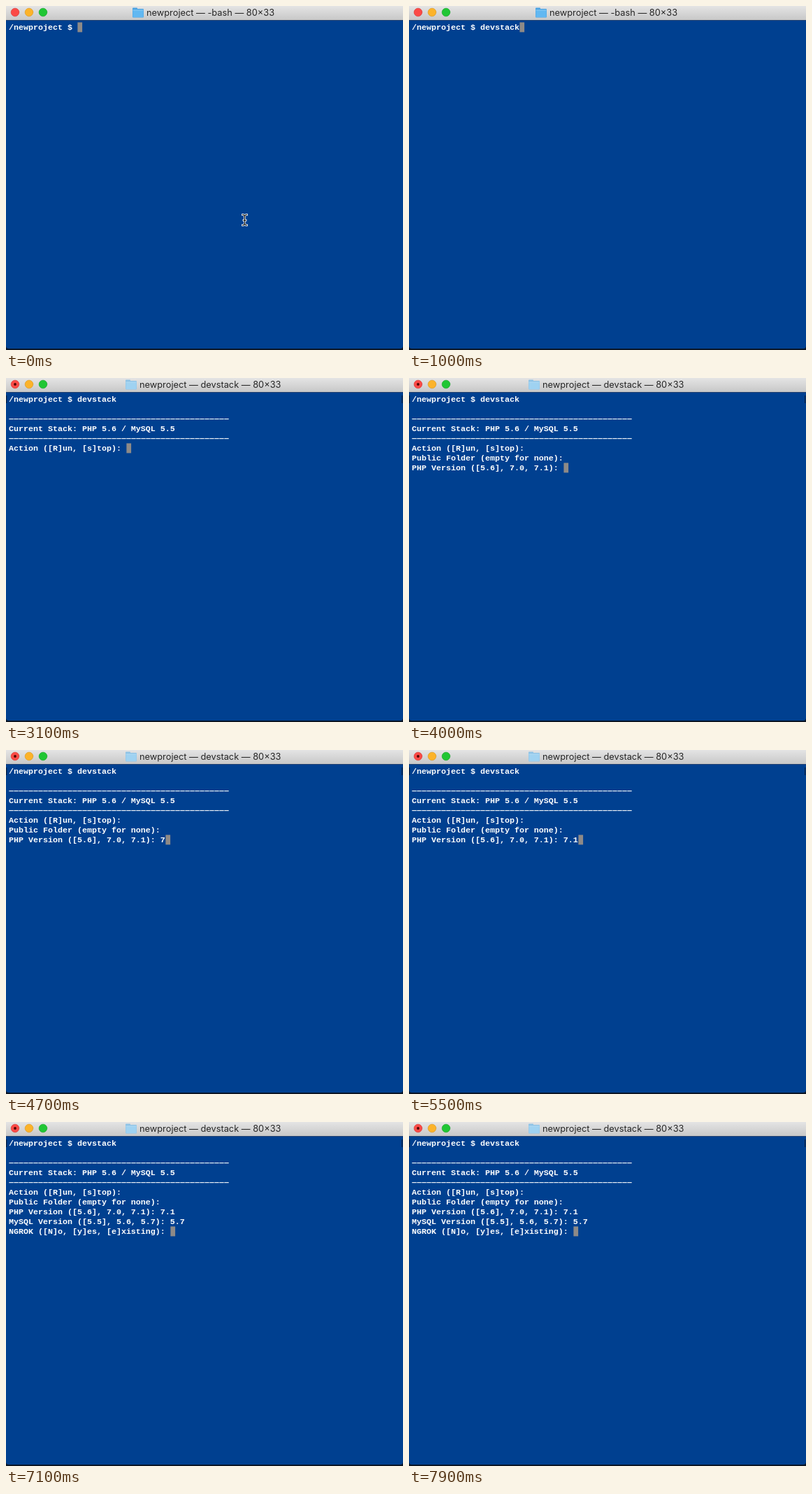
Write an HTML page with a canvas that moves like this. It is 568x492 px and loops after 8000 ms.

```html
<!DOCTYPE html>
<html lang="en">
<head>
<meta charset="utf-8">
<title>Terminal</title>
<style>
html, body { margin: 0; width: 100%; height: 100%; overflow: hidden; background: #004090; }
canvas { display: block; width: 568px; height: 492px; }
</style>
</head>
<body>
<canvas id="stage" width="568" height="492"></canvas>
<script>
const ctx = document.getElementById('stage').getContext('2d');
const W = 568, H = 492, LOOP = 8000;
const CELL = 7, LINE = 14, LEFT = 4, TOP = 23;
const MONO = 'bold 11.667px "Liberation Mono", "DejaVu Sans Mono", monospace';
const SANS = '12.8px Inter, Roboto, sans-serif';
const RUNNING = 2000;   // window title switches to the running command
const ENTER = 1300;
const RULE = '-'.repeat(45);

// Each row appears at `at`; `typed` is entered from `from`, one key per `step`.
const rows = [
  { at: 0, text: '/newproject $ ', typed: 'devstack', from: 300, step: 100 },
  { at: ENTER, text: '' },
  { at: ENTER, text: RULE },
  { at: ENTER, text: 'Current Stack: PHP 5.6 / MySQL 5.5' },
  { at: ENTER, text: RULE },
  { at: ENTER, text: 'Action ([R]un, [s]top): ' },
  { at: 3300, text: 'Public Folder (empty for none): ' },
  { at: 3800, text: 'PHP Version ([5.6], 7.0, 7.1): ', typed: '7.1', from: 4700, step: 200 },
  { at: 5800, text: 'MySQL Version ([5.5], 5.6, 5.7): ', typed: '5.7', from: 6200, step: 200 },
  { at: 6900, text: 'NGROK ([N]o, [y]es, [e]xisting): ' }
];

function rect(color, x, y, w, h) {
  ctx.fillStyle = color;
  ctx.fillRect(x, y, w, h);
}

function disc(x, y, r, fill, edge) {
  ctx.beginPath();
  ctx.arc(x, y, r, 0, Math.PI * 2);
  ctx.fillStyle = fill;
  ctx.fill();
  if (edge) {
    ctx.strokeStyle = edge;
    ctx.lineWidth = 0.7;
    ctx.stroke();
  }
}

function folder(x, faded) {
  const [back, front, edge] = faded
    ? ['#8fc3e6', '#9fd2f1', '#b9def3']
    : ['#4ba3e2', '#62b8f1', '#9bd5f8'];
  ctx.fillStyle = back;
  ctx.beginPath();
  ctx.roundRect(x, 2.5, 7, 5, 1);
  ctx.roundRect(x, 4, 16, 12.5, 1);
  ctx.fill();
  rect(front, x + 0.5, 6, 15, 10);
  rect(edge, x + 0.5, 5.5, 15, 0.8);
}

function titleBar(t) {
  const running = t >= RUNNING;
  const shade = ctx.createLinearGradient(0, 0, 0, 20);
  shade.addColorStop(0, '#e4e4e4');
  shade.addColorStop(1, '#c8c8c8');
  rect(shade, 0, 0, W, 20);
  rect('#24426f', 0, 20, W, 1);

  disc(13, 9, 5.8, '#fb4a46', '#dc3c38');
  disc(33, 9, 5.8, '#fcb32a', '#dd9b24');
  disc(53, 9, 5.8, '#20c634', '#1aa92b');
  if (running) disc(13, 9, 1.9, '#4d0504');

  const x = running ? 171 : 181;
  folder(x, running);
  ctx.font = SANS;
  ctx.fillStyle = '#262626';
  ctx.fillText(`newproject — ${running ? 'devstack' : '-bash'} — 80×33`, x + 20, 14);
}

function terminal(t) {
  let caret = [0, 0];
  ctx.font = MONO;
  rows.forEach((row, i) => {
    if (t < row.at) return;
    const keys = row.typed && t >= row.from ? Math.floor((t - row.from) / row.step) + 1 : 0;
    const line = row.text + (row.typed || '').slice(0, keys);
    const y = TOP + i * LINE;
    if (row.text === RULE) {
      for (let c = 0; c < line.length; c++) rect('#e9eef5', LEFT + c * CELL + 0.3, y + 7, CELL - 0.6, 1.2);
    } else {
      ctx.fillStyle = '#fff';
      ctx.fillText(line, LEFT, y + 11);
    }
    caret = [line.length, i];
  });
  rect('#8e8a87', LEFT + caret[0] * CELL + 0.4, TOP + caret[1] * LINE + 0.4, CELL - 0.3, LINE);
  if (t >= ENTER) {
    rect('#0a2145', 0, 25, 1.3, 11);
    rect('#0a2145', W - 2, 25, 1.3, 11);
  }
}

function pointer(x, y) {
  const path = new Path2D();
  for (const s of [-1, 1]) {
    path.moveTo(x - 3, y + s * 7.5);
    path.quadraticCurveTo(x, y + s * 7.5, x, y + s * 5);
    path.quadraticCurveTo(x, y + s * 7.5, x + 3, y + s * 7.5);
  }
  path.moveTo(x, y - 5);
  path.lineTo(x, y + 5);
  path.moveTo(x - 1.5, y + 0.5);
  path.lineTo(x + 1.5, y + 0.5);
  ctx.lineCap = 'square';
  ctx.strokeStyle = '#e8edf4';
  ctx.lineWidth = 2.8;
  ctx.stroke(path);
  ctx.strokeStyle = '#111';
  ctx.lineWidth = 1.1;
  ctx.stroke(path);
}

function draw(t) {
  rect('#0b1626', 0, 0, W, H);
  ctx.fillStyle = '#004090';
  ctx.beginPath();
  ctx.roundRect(0, 0, W, 490, [0, 0, 4, 4]);
  ctx.fill();
  titleBar(t);
  terminal(t);
  if (t < rows[0].from) pointer(341.5, 306);
}

const start = performance.now();
function tick() {
  draw((performance.now() - start) % LOOP);
  requestAnimationFrame(tick);
}
tick();
</script>
</body>
</html>
```
